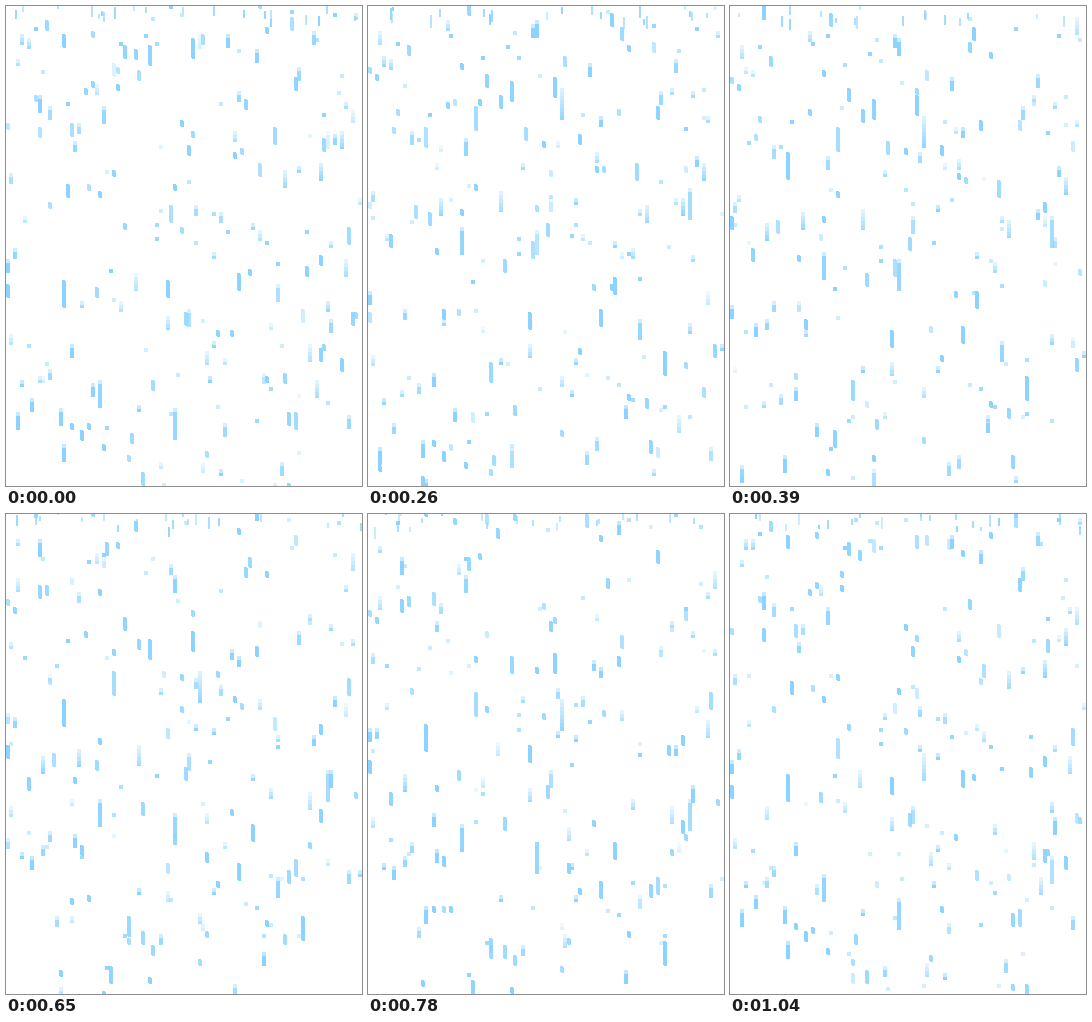
Write an HTML page with a canvas that moves like this. It is 356 px wide and 480 px high and loops after 1170 ms.

```html
<!DOCTYPE html>
<html lang="en">
<head>
<meta charset="utf-8">
<title>Rain</title>
<style>
html, body { margin: 0; width: 100%; height: 100%; overflow: hidden; background: #fff; }
canvas { display: block; }
</style>
</head>
<body>
<canvas id="rain" width="356" height="480"></canvas>
<script>
const W = 356, H = 480, CELL = 3.56;
const STEP = 130, STEPS = 9, TRAVEL = 8.2;
const COUNT = 250;
const ctx = document.getElementById('rain').getContext('2d');

// Distance fallen; the fall slows briefly twice per loop.
const fallen = step => step - (step > 4 ? 0.4 : 0);
const clamp = v => Math.max(0, Math.min(1, v));
const snap = v => Math.round(Math.round(v / CELL) * CELL);

function seeded(seed) {
  return () => {
    seed = (seed + 0x6D2B79F5) | 0;
    let t = Math.imul(seed ^ (seed >>> 15), 1 | seed);
    t = (t + Math.imul(t ^ (t >>> 7), 61 | t)) ^ t;
    return ((t ^ (t >>> 14)) >>> 0) / 4294967296;
  };
}

const rand = seeded(71);

// y is the position at the loop start; birth and life are in loops.
function makeDrop(x, y, len, birth = 0, life = 1) {
  return {
    x: Math.floor(Math.floor(x / CELL) * CELL), y, len, birth, life,
    speed: len * 0.8 + 2.7, style: rand(), tone: 0.7 + rand() * 0.45
  };
}

function randomDrop(i) {
  const x = (i * 0.618034 % 1) * W;
  const len = 4 + rand() ** 1.7 * 16;
  const birth = rand(), life = 0.5 + rand() * 0.6;
  const d = makeDrop(x, 0, len, birth, life);
  d.y = rand() * (H + 40) - 20 - d.speed * TRAVEL * (birth + life / 2);
  return d;
}

// A few long streaks stand out among the small drops.
const drops = [
  makeDrop(108, 57, 24), makeDrop(297, 303, 24),
  makeDrop(321, 125, 32), makeDrop(193, 25, 32),
  makeDrop(169, 169, 32, 0.2), makeDrop(57, 70, 28, 0.2),
  makeDrop(94, 169, 28, 0.1)
];
for (let i = 0; i < COUNT; i++) drops.push(randomDrop(i));

function rect(x, y, w, h, alpha) {
  ctx.globalAlpha = clamp(alpha);
  ctx.fillRect(x, y, w, h);
}

function drawDrop(d, y, strength) {
  const { x, style } = d;
  const top = snap(y);
  const len = Math.max(3, snap(d.len * (0.4 + 0.6 * strength)));
  const a = (0.25 + 0.75 * strength) * d.tone;
  if (len < 6) {
    rect(x, top, 4, len, a * (style < 0.4 ? 0.5 : 0.9));
  } else if (style < 0.2) {
    for (let i = 0; i < len; i += 4) {
      rect(x, top + i, 4, Math.min(4, len - i), a * (0.3 + 0.7 * i / len));
    }
  } else if (style < 0.55) {
    rect(x, top, 4, 4, a * 0.45);
    rect(x, top + 4, 4, len - 4, a);
  } else {
    rect(x, top, 3, 1, a);
    rect(x, top + 1, 4, len - 2, a);
    rect(x + 1, top + len - 1, 3, 1, a);
  }
}

// Thin fresh drops along the top edge.
function drawSlivers(step) {
  const r = seeded(900 + step);
  for (let i = 0; i < 20; i++) {
    const x = Math.floor(r() * W), y = Math.floor(r() * 18) - 4;
    rect(x, y, 2, 4 + Math.floor(r() * 10), 0.4 + r() * 0.6);
  }
}

function draw(step) {
  ctx.globalAlpha = 1;
  ctx.fillStyle = '#fff';
  ctx.fillRect(0, 0, W, H);
  ctx.fillStyle = '#8cd4ff';
  for (const d of drops) {
    for (let k = 0; k < 3; k++) {
      const t = fallen(step) + k * TRAVEL;
      const age = t / TRAVEL - d.birth;
      if (age < 0 || age >= d.life) continue;
      const strength = clamp(0.2 + Math.min(age, d.life - age) / 0.12);
      drawDrop(d, d.y + d.speed * t, strength);
    }
  }
  drawSlivers(step);
}

let shown = -1;
let start = null;
function tick(now) {
  if (start === null) start = now;
  const step = Math.floor((now - start) / STEP) % STEPS;
  if (step !== shown) draw(shown = step);
  requestAnimationFrame(tick);
}
draw(0);
requestAnimationFrame(tick);
</script>
</body>
</html>
```
